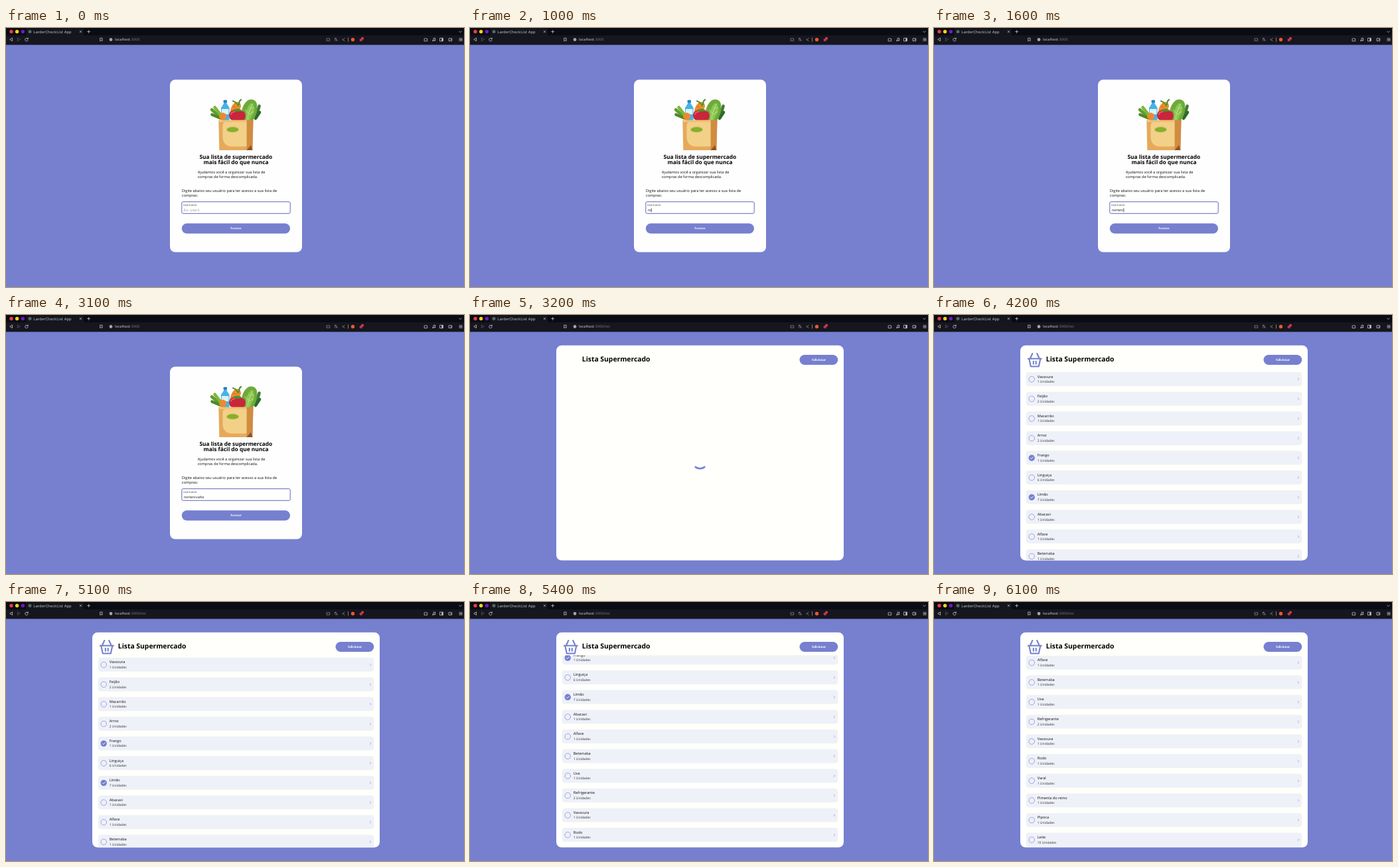
These frames come from a looping animation (690 by 390 pixels, 7.1 s). An HTML page:

```html
<!DOCTYPE html>
<html lang="pt-BR">
<head>
<meta charset="utf-8">
<title>Lista</title>
<style>
  html, body { margin: 0; width: 100%; height: 100%; overflow: hidden; background: #7680cf; }
  svg { display: block; width: 690px; height: 390px; }
  text { font-family: "Open Sans", "Noto Sans", sans-serif; font-weight: 500; fill: #111; text-rendering: geometricPrecision; }
  .ui { font-family: "DejaVu Sans", sans-serif; font-weight: 400; }
  .bold { font-weight: 700; fill: #000; }
  .btn { font: 700 5.1px "Liberation Serif", serif; fill: #fff; text-anchor: middle; }
  .body { font-size: 5.65px; }
  .line { fill: none; stroke-linecap: round; stroke-linejoin: round; }
  .main { fill: #7680cf; }
</style>
</head>
<body>
<svg viewBox="0 0 690 390">
  <defs>
    <clipPath id="listClip"><rect x="138" y="80.2" width="418" height="289.3"/></clipPath>
  </defs>
  <rect class="main" width="690" height="390"/>

  <!-- browser frame -->
  <rect width="690" height="25.4" fill="#15161e"/>
  <rect width="690" height="11" fill="#090c12"/>
  <rect x="30" y="0.5" width="87" height="10.5" rx="1.5" fill="#14161e"/>
  <circle cx="8" cy="5.5" r="2.7" fill="#f0384a"/>
  <circle cx="16.6" cy="5.5" r="2.7" fill="#f2d21c"/>
  <circle cx="25.4" cy="5.5" r="2.7" fill="#7a12c4"/>
  <circle cx="36" cy="5.5" r="2.5" fill="#55646c"/>
  <text class="ui" x="41.3" y="7.5" style="font-size:5.55px;fill:#b9bbc0">LarderCheckList App</text>
  <text class="ui" x="164" y="19.4" style="font-size:5.1px;fill:#d0d2d6">localhost<tspan id="path" fill="#74767e">:3000</tspan></text>
  <g class="line" stroke="#c4c6cc" stroke-width=".8">
    <path d="M111.2 4.2l2.6 2.6m0-2.6l-2.6 2.6M122.6 5.5h4M124.6 3.5v4M682.8 5l1.7 1.6 1.7-1.6"/>
    <path d="M9.6 15.3v4.4l-3.6-2.2z"/>
    <path d="M17.4 15.3v4.4l3.6-2.2z" stroke="#565860"/>
    <path d="M32.9 16.2a2.3 2.3 0 1 0 .3 2M33.2 14.9v1.6h-1.6"/>
    <path d="M142.1 15.2h2.9v4.4l-1.45-1.2-1.45 1.2z"/>
    <path d="M483.4 15.9h4.3v3.4h-4.3zM495 15.8h3M496.5 15v.8q0 1.8-1.6 2.6M496.8 19.6l1.2-2.6 1.2 2.6M510.2 15.6l-3.6 1.9 3.6 1.9" stroke="#92949c" stroke-width=".7"/>
    <path d="M515.5 14.6v5.6" stroke-width=".6"/>
    <path d="M630.5 16.1h1.3q.7-1.5 1.4 0h1.5v3.6h-4.2z"/>
    <path d="M643.9 19.2v-3.5l2.7-.6v3.4"/>
    <path d="M653.9 15.2h4.4v4.6h-4.4zM667.4 15.7h4.3v3.8h-4.3zM669.8 17.6h1.9M682.9 15.8h4.4M682.9 17.5h4.4M682.9 19.2h4.4"/>
  </g>
  <rect x="656.3" y="15.2" width="2.1" height="4.6" fill="#c4c6cc"/>
  <circle cx="643.2" cy="19.2" r=".9" fill="#c4c6cc"/>
  <circle cx="645.9" cy="18.6" r=".9" fill="#c4c6cc"/>
  <circle cx="158" cy="17.5" r="2.4" fill="#a3a5ab"/>
  <circle cx="522.5" cy="17.5" r="2.7" fill="#f4552d"/>
  <circle cx="534.8" cy="18" r="2.3" fill="#a83a58"/>
  <rect x="535.2" y="13.8" width="3.8" height="3.8" rx="1" fill="#e0333f"/>

  <!-- sign-in page -->
  <g id="login">
    <rect x="247" y="77.8" width="199" height="259.8" rx="8" fill="#fefefe"/>
    <g id="bag">
      <g class="line" stroke-width="4.6">
        <path d="M310 123l14 12" stroke="#5f9c2c"/>
        <path d="M314.5 119.5l10 13" stroke="#7cb83a"/>
        <path d="M310.5 130.5l12 5" stroke="#4c8a2a"/>
        <path d="M381.5 117.5l-5 17" stroke="#3f7f31"/>
        <path d="M382 127l-6 9" stroke="#2f6a2b"/>
      </g>
      <path d="M357 139c-4-10-2-22 6-29 6-5 14-2 15 5 1 8-1 17-6 24z" fill="#6cab3b"/>
      <path d="M361 139c-1-10 1-19 8-26 5 2 6 8 4 14l-6 12z" fill="#8cc652"/>
      <path class="line" d="M364 138q1-14 8-24M365 128l-5-5M366 130l7-4M368 121l5-1" stroke="#c3e28c" stroke-width=".9"/>
      <path d="M328 109.5h4.6v4.5l4 6V139h-12.600v-19l4-6z" fill="#45b4e4"/>
      <path d="M325 122h10.500v8H325z" fill="#d9f2fb"/>
      <rect x="327.6" y="108.5" width="5.4" height="4" rx="1" fill="#2a7fc0"/>
      <path d="M337 135c0-12 3-19 8-23 5-2 9 1 9 6l-6 19z" fill="#f08a2c"/>
      <path class="line" d="M342 118l4 1.500M340 124l4 1M347 114l3 2" stroke="#c9631c" stroke-width=".8"/>
      <path d="M350 117q-4-6-8-7M351 115q0-5 3-7" class="line" stroke="#4f942f" stroke-width="2.2"/>
      <circle cx="326.500" cy="133" r="5.500" fill="#ee8a2a"/>
      <path d="M336 132c0-7 6-9 12-7 7-2 13 1 13 7 0 6-5 9-12 9s-13-3-13-9z" fill="#c8263a"/>
      <path d="M339 130q1-4 6-4" class="line" stroke="#ea6470" stroke-width="1.500"/>
      <path d="M341 124q7-5 15 0-7 4-15 0z" fill="#4d9130"/>
      <path d="M320.300 138.700h52.200l-1.200 45.300h-50z" fill="#e6a95a"/>
      <path d="M362.500 138.700h10l-1.200 45.300h-8.800z" fill="#d08c40"/>
      <path d="M320.300 138.700h42.200v3h-42.200z" fill="#f0c27a"/>
      <path d="M326.500 146.500q0-4.800 5-4.800h31V178.500h-23q-13-1-13-15z" fill="#f3d087"/>
      <path d="M362.500 184l6.500-7.500 2.300 7.500z" fill="#8a5428"/>
      <ellipse cx="341.500" cy="153" rx="9.600" ry="4.400" fill="#b9c65a"/>
      <ellipse cx="341.500" cy="153" rx="8.600" ry="3.600" fill="#8aad2b"/>
    </g>
    <g text-anchor="middle" style="font-size:8.34px">
      <text class="bold" x="346.300" y="197.300">Sua lista de supermercado</text>
      <text class="bold" x="346.500" y="205.400">mais fácil do que nunca</text>
    </g>
    <g class="body">
      <text x="288.700" y="218.500">Ajudamos você a organizar sua lista de</text>
      <text x="288.700" y="226">compras de forma descomplicada.</text>
      <text x="264.800" y="246.600">Digite abaixo seu usuário para ter acesso a sua lista de</text>
      <text x="264.800" y="254.100">compras:</text>
    </g>
    <rect x="264.800" y="261.700" width="163.400" height="17.600" rx="2" fill="#fff" stroke="#6068b4" stroke-width="1"/>
    <text x="267" y="267.800" style="font-size:4.200px;fill:#444">Username</text>
    <text id="field" class="ui" x="267.800" y="275.900" style="font-size:5.100px"></text>
    <rect id="caret" y="271.300" width=".6" height="6" fill="#111"/>
    <rect class="main" x="264.800" y="294.200" width="163.200" height="15.300" rx="7.650"/>
    <text class="btn" x="346.300" y="303.400">Acessar</text>
  </g>

  <!-- list page -->
  <g id="page">
    <rect x="130" y="45.800" width="433" height="323.700" rx="8" fill="#fffffc"/>
    <g id="basket" class="line" stroke="#7680cf" stroke-width="2.100">
      <path d="M141.700 65.700H161.800M143.300 66l2.500 11.500h12l2.500-11.500M145 65.200l3.300-7.200M158.500 65.200l-3.300-7.200M149.800 69.700v4M153.700 69.700v4"/>
    </g>
    <text class="bold" x="168.800" y="70.400" style="font-size:10.350px">Lista Supermercado</text>
    <rect class="main" x="496.500" y="59.900" width="57.800" height="15.200" rx="7.600"/>
    <text class="btn" x="525.400" y="69.100">Adicionar</text>
    <g id="spinner">
      <path d="M354.100 228.100A10.750 10.750 0 0 1 338.900 228.100" fill="none" stroke="#7680cf" stroke-width="2.700"/>
    </g>
    <g id="listBox" clip-path="url(#listClip)"><g id="list"></g></g>
  </g>
</svg>
<script>
const LOOP = 7100, STEP = 100;
const ROW_TOP = 86, ROW_GAP = 29.63;
const SCROLL = { from: 5065, to: 5700, dist: 242.3 };
const OPEN_PAGE = 3200, SHOW_BASKET = 3300, SHOW_LIST = 4200;
const USER = "romenivalto";
// [time, letters typed]
const KEYS = [[1000, 2], [1100, 3], [1300, 4], [1500, 5], [1600, 6],
  [1800, 7], [1900, 8], [2100, 9], [2300, 10], [2600, 11]];
const ITEMS = ["Vassoura", "Feijão 2", "Macarrão", "Arroz 2", "Frango *", "Linguiça 6",
  "Limão 7 *", "Abacaxi", "Alface", "Beterraba", "Uva", "Refrigerante 2", "Vassoura",
  "Rodo", "Varal", "Pimenta do reino", "Pipoca", "Leite 10"];

const $ = id => document.getElementById(id);
const show = (id, on) => { $(id).style.display = on ? "" : "none"; };

function rowMarkup(item, i) {
  const [, name, count = 1, done] = item.match(/^(.+?)(?: (\d+))?( \*)?$/);
  const mark = done
    ? `<circle class="main" cx="147.2" cy="10.7" r="4.7"/>
       <path class="line" d="M145.2 10.8l1.400 1.400 2.700-2.800" stroke="#fff" stroke-width=".9"/>`
    : `<circle cx="147.2" cy="10.7" r="4.3" fill="none" stroke="#8991d6" stroke-width=".8"/>`;
  return `<g transform="translate(0 ${ROW_TOP + i * ROW_GAP})">
    <rect x="138.800" width="415.400" height="21" rx="4" fill="#eef1f8"/>${mark}
    <text x="155.700" y="8.500" style="font-size:5.600px">${name}</text>
    <text x="155.700" y="16.100" style="font-size:4.950px;fill:#333;font-weight:400">${count} Unidades</text>
    <path class="line" d="M548.300 9.200l1.400 1.500-1.400 1.500" stroke="#7680cf" stroke-width=".6"/></g>`;
}
$("list").innerHTML = ITEMS.map(rowMarkup).join("");

function setField(t) {
  const key = KEYS.filter(k => k[0] <= t).pop();
  const typed = key ? USER.slice(0, key[1]) : "";
  const field = $("field");
  field.textContent = typed || "Ex: user1";
  field.style.fill = typed ? "#222" : "#999";
  $("caret").setAttribute("x", 267.8 + (typed ? field.getComputedTextLength() : 0));
  show("caret", (t >= 100 && t < 400) || (t >= 1000 && t < 3000));
}

function scrollAt(t) {
  const x = Math.min(1, Math.max(0, (t - SCROLL.from) / (SCROLL.to - SCROLL.from)));
  return SCROLL.dist * x * x * (3 - 2 * x);
}

let last = -1;
function draw(t) {
  if (t === last) return;
  last = t;
  const listed = t >= OPEN_PAGE;
  show("login", !listed);
  show("page", listed);
  $("path").textContent = listed ? ":3000/list" : ":3000";
  if (!listed) return setField(t);
  show("basket", t >= SHOW_BASKET);
  show("spinner", t < SHOW_LIST);
  show("listBox", t >= SHOW_LIST);
  $("spinner").setAttribute("transform", `rotate(${(t - OPEN_PAGE) * 0.36} 346.5 220.5)`);
  $("list").setAttribute("transform", `translate(0 ${-scrollAt(t)})`);
}

const start = performance.now();
function tick() {
  const t = (performance.now() - start) % LOOP;
  draw(Math.floor(t / STEP) * STEP);
  requestAnimationFrame(tick);
}
draw(0);
requestAnimationFrame(tick);
</script>
</body>
</html>
```
